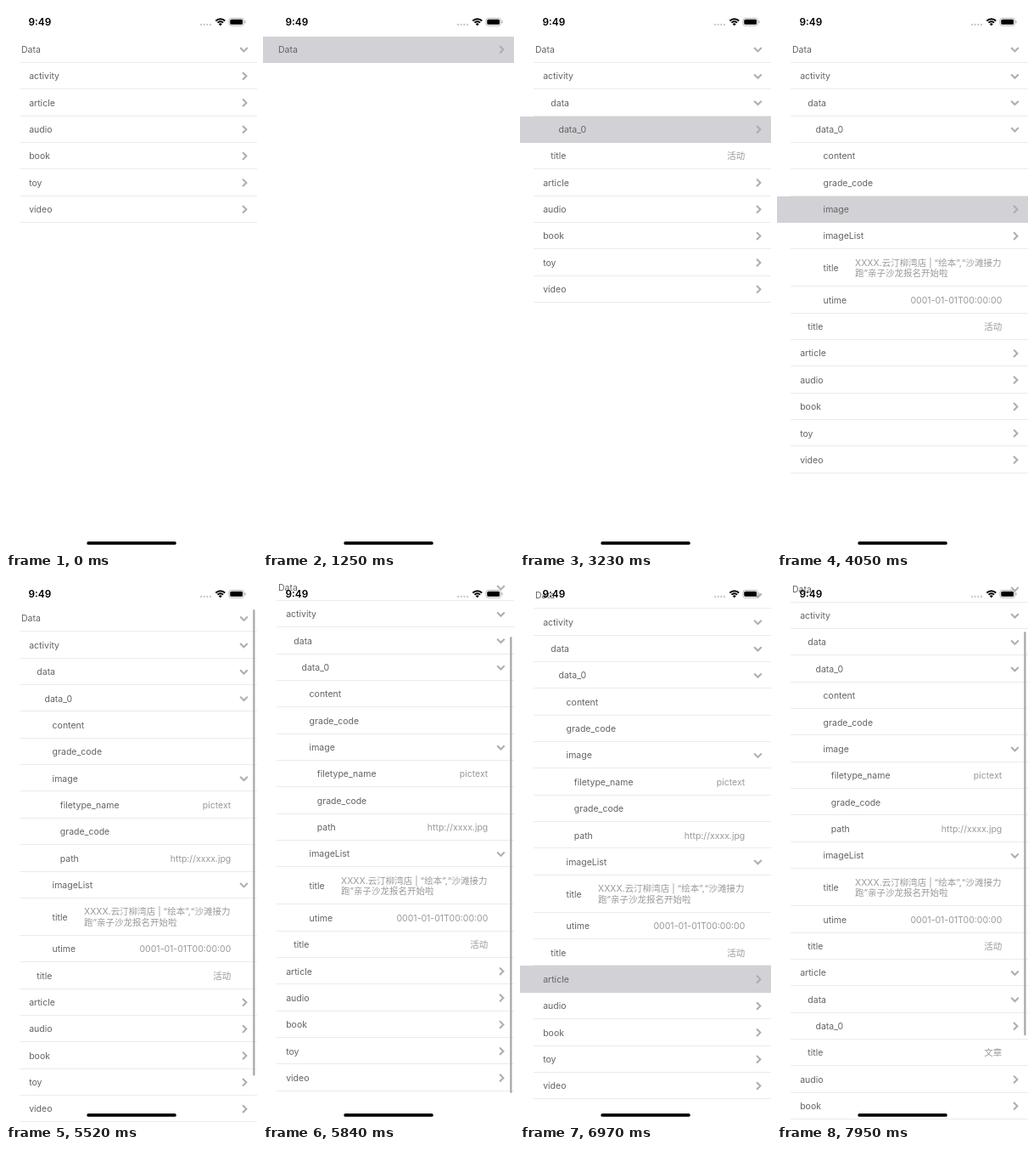
These frames come from a looping animation (296 by 640 pixels, 8 s). An HTML page with a canvas:

```html
<!DOCTYPE html>
<html lang="zh-Hans">
<head>
<meta charset="utf-8">
<title>Expandable list</title>
<style>
  html, body { margin: 0; width: 100%; height: 100%; overflow: hidden; background: #fff; }
  canvas { display: block; width: 296px; height: 640px; }
</style>
</head>
<body>
<canvas id="stage"></canvas>
<script>
const W = 296, H = 640, LOOP = 8000;
const TOP = 35.5, ROW = 31.35, TALL = 44, VIEW = 577.7, INDENT = 9.15;
const FONT = 'Inter, "Noto Sans CJK SC", "Noto Sans CJK", sans-serif';

const canvas = document.getElementById('stage');
const ctx = canvas.getContext('2d');
const ratio = window.devicePixelRatio || 1;
canvas.width = W * ratio;
canvas.height = H * ratio;

const leaf = (label, ...lines) => ({ label, lines });
// `order` is the position in the sequence of taps that open the rows.
const branch = (label, order = Infinity, children = []) => ({ label, order, children, lines: [] });

const tree = branch('Data', 1, [
  branch('activity', 2, [
    branch('data', 3, [
      branch('data_0', 4, [
        leaf('content'),
        leaf('grade_code'),
        branch('image', 5, [
          leaf('filetype_name', 'pictext'),
          leaf('grade_code'),
          leaf('path', 'http://xxxx.jpg')
        ]),
        branch('imageList', 6),
        leaf('title', 'XXXX.云汀柳湾店 | “绘本”,“沙滩接力', '跑”亲子沙龙报名开始啦'),
        leaf('utime', '0001-01-01T00:00:00')
      ])
    ]),
    leaf('title', '活动')
  ]),
  branch('article', 7, [
    branch('data', 8, [branch('data_0')]),
    leaf('title', '文章')
  ]),
  ...['audio', 'book', 'toy', 'video'].map(name => branch(name))
]);

const step = (at, opened, pressed, offset = 0, bar = false) => ({ at, opened, pressed, offset, bar });
const REST = 30.6;
const steps = [
  step(0, 1, false),
  step(570, 0, false),
  step(1250, 0, true),
  step(1850, 1, true),
  step(2540, 2, true),
  step(3230, 3, true),
  step(4050, 4, true),
  step(4850, 5, true),
  ...[3.5, 16, 30, 40, 45, 37, 31.8, 31].map((offset, i) =>
    step(i === 7 ? 6280 : 5520 + i * 640 / 6, 6, false, offset, true)),
  step(6430, 6, false, REST, true),
  step(6970, 6, true, REST),
  step(7550, 7, true, REST),
  step(7950, 8, false, 38.2, true)
];

function visibleRows(node, opened, depth = 0, rows = []) {
  rows.push({ node, depth });
  if (node.order <= opened) {
    node.children.forEach(child => visibleRows(child, opened, depth + 1, rows));
  }
  return rows;
}

function text(str, x, middle, color, align = 'left', size = 10.5, weight = 400) {
  ctx.font = `${weight} ${size}px ${FONT}`;
  ctx.textAlign = align;
  ctx.fillStyle = color;
  ctx.fillText(str, x, middle + size * 0.36);
}

function pill(x, y, w, h, r, color) {
  ctx.fillStyle = color;
  ctx.beginPath();
  ctx.roundRect(x, y, w, h, r);
  ctx.fill();
}

function chevron(y, open) {
  ctx.save();
  ctx.translate(open ? 280.5 : 281.2, y);
  if (open) ctx.rotate(Math.PI / 2);
  ctx.beginPath();
  ctx.moveTo(-2.1, -4.3);
  ctx.lineTo(2.2, 0);
  ctx.lineTo(-2.1, 4.3);
  ctx.lineWidth = 2.1;
  ctx.strokeStyle = '#aeaeae';
  ctx.stroke();
  ctx.restore();
}

function drawRow({ node, depth }, y, height, state) {
  const middle = y + height / 2;
  const { label, lines, order } = node;
  if (state.pressed && order === state.opened + 1) {
    ctx.fillStyle = '#d2d2d6';
    ctx.fillRect(0, Math.round(y), W, Math.round(y + height) - Math.round(y));
  } else {
    ctx.fillStyle = '#ebebeb';
    ctx.fillRect(16, Math.round(y + height) - 1, W - 16, 1);
  }
  text(label, 18 + depth * INDENT, middle, '#636363');
  if (lines.length === 1) text(lines[0], 265.3, middle, '#999', 'right');
  if (lines.length === 2) {
    lines.forEach((line, i) => text(line, 92, middle + (i ? 6.3 : -6.3), '#999'));
  }
  if (order) chevron(middle, order <= state.opened);
}

function drawStatusBar() {
  text('9:49', 26.5, 19, '#000', 'left', 11.8, 600);
  for (let i = 0; i < 4; i++) pill(229 + i * 3.6, 20.8, 2.2, 2.2, 1.1, '#c4c4c4');

  ctx.strokeStyle = '#000';
  ctx.lineWidth = 1.9;
  for (const radius of [7.7, 4.7]) {
    ctx.beginPath();
    ctx.arc(252.8, 22.9, radius, -Math.PI * 0.75, -Math.PI * 0.25);
    ctx.stroke();
  }
  ctx.fillStyle = '#000';
  ctx.beginPath();
  ctx.moveTo(252.8, 23.3);
  ctx.arc(252.8, 23.3, 2.9, -Math.PI * 0.75, -Math.PI * 0.25);
  ctx.fill();

  ctx.strokeStyle = '#aaa';
  ctx.lineWidth = 0.8;
  ctx.beginPath();
  ctx.roundRect(262.9, 14.4, 17.6, 8.8, 2.6);
  ctx.stroke();
  pill(264.3, 15.8, 14.8, 6, 1.5, '#000');
  pill(281.5, 17.3, 1.1, 3, 0.5, '#aaa');
}

function drawScrollBar(offset, content) {
  const top = 34 + offset * 536 / content;
  const bottom = Math.min(top + VIEW * VIEW / content, 606);
  pill(291.3, top, 2.2, bottom - top, 1.1, '#a6a6a6');
}

function draw(time) {
  const state = steps.findLast(s => s.at <= time);
  ctx.setTransform(ratio, 0, 0, ratio, 0, 0);
  ctx.fillStyle = '#fff';
  ctx.fillRect(0, 0, W, H);

  let y = TOP - state.offset;
  for (const row of visibleRows(tree, state.opened)) {
    const height = row.node.lines.length > 1 ? TALL : ROW;
    drawRow(row, y, height, state);
    y += height;
  }
  if (state.bar) drawScrollBar(state.offset, y + state.offset - TOP);
  drawStatusBar();
  pill(95.3, 630, 105.5, 3.8, 1.9, '#000');
}

const start = performance.now();
function tick() {
  draw((performance.now() - start) % LOOP);
  requestAnimationFrame(tick);
}
tick();
</script>
</body>
</html>
```
